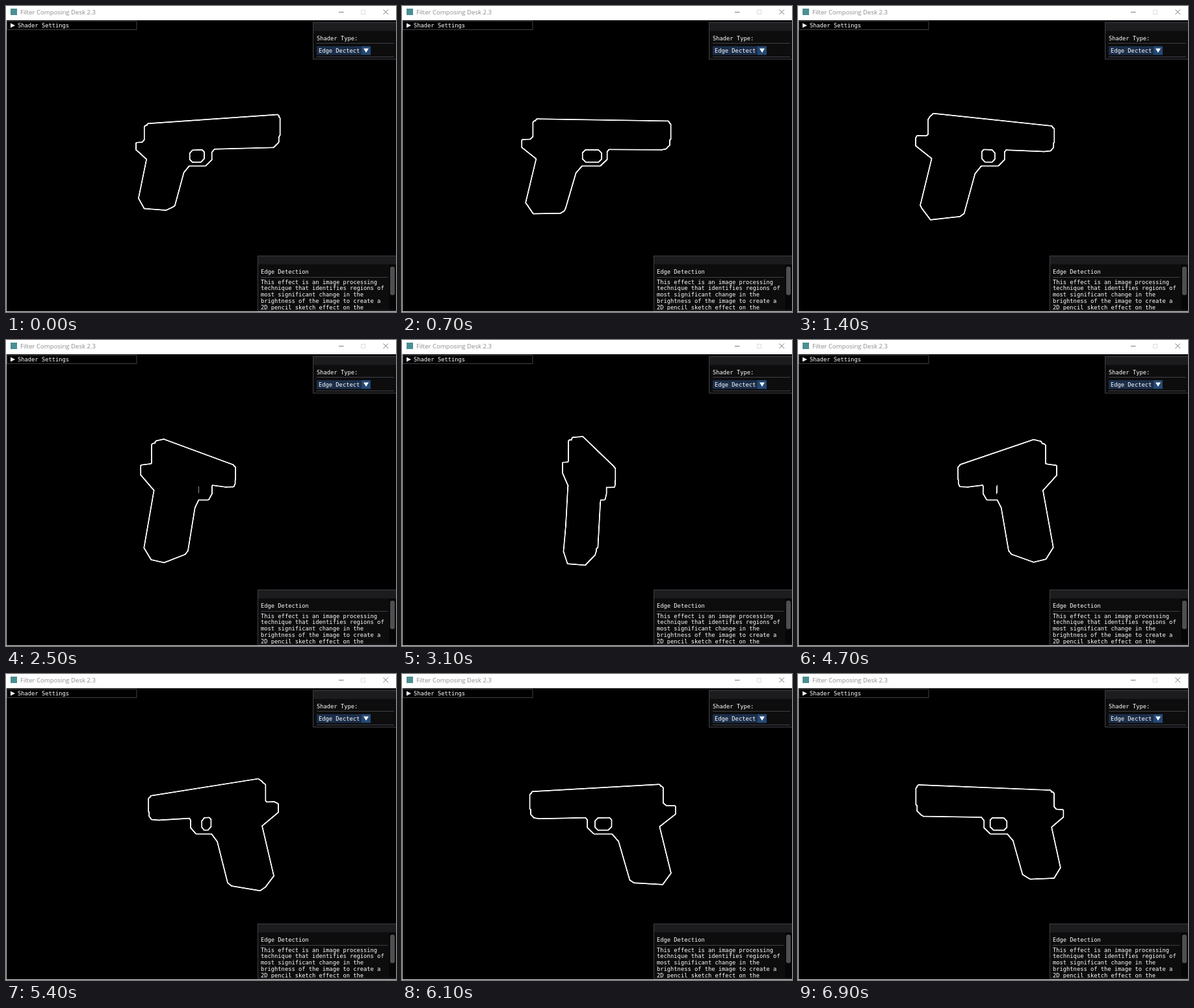
Write an HTML page with a canvas that moves like this. It is 600x472 px and loops after 7000 ms.

```html
<!DOCTYPE html>
<html lang="en">
<head>
<meta charset="utf-8">
<style>
  html, body { margin: 0; width: 100%; height: 100%; overflow: hidden; background: #000; }
  canvas, svg { position: absolute; left: 0; top: 0; }
  text { font: 8.75px "DejaVu Sans Mono", monospace; fill: #fff; white-space: pre; }
  .title { font: 9.6px "Open Sans", sans-serif; fill: #8c8c8c; }
  .panel { fill: #0d0d0e; stroke: #3f3f48; }
  .bar { fill: #1c1c1e; }
  .rule { stroke: #3f3f48; }
</style>
</head>
<body>
<canvas width="600" height="472"></canvas>
<svg width="600" height="472">
  <clipPath id="field"><rect x="478" y="62" width="66" height="14"/></clipPath>
  <clipPath id="info"><rect x="387" y="385" width="203" height="84"/></clipPath>

  <path d="M.5 22V472" stroke="#bbb"/>
  <path d="M0 471.5H600" stroke="#ddd"/>
  <rect width="600" height="22" fill="#fff"/>
  <rect x="7" y="4" width="10" height="10" fill="#4b8f92"/>
  <text class="title" x="22" y="13">Filter Composing Desk 2.3</text>
  <path d="M512 9.5h7.5M580.5 5.5l7.5 7.5m0 -7.5l-7.5 7.5" stroke="#777" fill="none"/>
  <rect x="546.5" y="6.5" width="6" height="6" fill="none" stroke="#ddd"/>

  <rect class="panel" x="1.5" y="23.5" width="199.5" height="13" style="fill: #000"/>
  <path d="M7 26.5L14 30L7 33.5Z" fill="#fff"/>
  <text x="18" y="33">Shader Settings</text>

  <rect class="panel" x="472.5" y="25.5" width="128" height="56.5"/>
  <rect class="bar" x="473" y="26" width="127" height="12.5"/>
  <text x="478" y="53">Shader Type:</text>
  <path class="rule" d="M478 57.5H597M478 78.5H597"/>
  <rect x="478" y="62" width="69" height="13.5" fill="#1b2d48"/>
  <rect x="547" y="62" width="14" height="13.5" fill="#244975"/>
  <path d="M550 65.5H558L554 72Z" fill="#fff"/>
  <text x="481" y="72" clip-path="url(#field)">Edge Dectection</text>

  <rect class="panel" x="387.5" y="385.5" width="213" height="84.5"/>
  <rect class="bar" x="388" y="386" width="212" height="12.5"/>
  <rect x="589.5" y="399" width="10" height="70" fill="#060606"/>
  <rect x="591" y="402" width="7" height="44" rx="3" fill="#4f4f4f"/>
  <path class="rule" d="M392 418.5H587"/>
  <text x="392" y="413">Edge Detection</text>
  <g id="lines" clip-path="url(#info)"></g>
</svg>
<script>
const LOOP = 7000, STEP = 100;
const CENTER_X = 301, CENTER_Y = 246, PERSPECTIVE = 0.0033;
const ctx = document.querySelector('canvas').getContext('2d');

const description = `This effect is an image processing
technique that identifies regions of
most significant change in the
brightness of the image to create a
2D pencil sketch effect on the`;
document.getElementById('lines').innerHTML = description.split('\n')
  .map((line, i) => `<text x="392" y="${428.7 + i * 9.75}">${line}</text>`).join('');

// Rectangle with cut corners.
const box = (x0, y0, x1, y1, cut) => [
  [x0 + cut, y0], [x1 - cut, y0], [x1, y0 + cut], [x1, y1 - cut],
  [x1 - cut, y1], [x0 + cut, y1], [x0, y1 - cut], [x0, y0 + cut]
];

// Side outlines (along the barrel, height), each extruded by its half thickness.
const guard = [[-32, 9], [-24, 1], [3, 1], [12, 9.5], [12, 21], [18, 28], [-32, 28]];
const tail = [[-110, 27], [-110, 36.5], [-99, 37], [-94, 42], [-60, 42], [-60, 10], [-89, 10]];
const grip = [
  [-24.5, 1], [-35, -11], [-51, -66], [-56, -69], [-94, -69],
  [-104, -54], [-89, 10], [-80, 28], [-30, 28]
];
const palm = [[-45, 15], [-62, -58], [-90, -58], [-80, 15]];
const parts = [
  { rings: [box(-94, 40, 110.5, 64, 1)], half: 8.2 },
  { rings: [box(-91, 50, 109.5, 67.5, 1)], half: 5.5 },
  { rings: [box(-90, 27, 109, 50, 5)], half: 8 },
  { rings: [guard, box(-25, 3.5, 8.5, 26.5, 6)], half: 9.8 },
  { rings: [tail], half: 8 },
  { rings: [grip], half: 9.5 },
  { rings: [palm], half: 14.5 }
];

function project([u, h], v, angle) {
  const c = Math.cos(angle), s = Math.sin(angle);
  const scale = 1 / (1 + PERSPECTIVE * (u * s + v * c));
  return [CENTER_X + (u * c - v * s) * scale, CENTER_Y - h * scale];
}

function addPolygon(path, points) {
  points.forEach(([x, y], i) => i ? path.lineTo(x, y) : path.moveTo(x, y));
  path.closePath();
}

// Both side faces plus the walls that join them.
function extrude({ rings, half }, angle) {
  const near = new Path2D(), far = new Path2D(), faces = [near, far];
  for (const ring of rings) {
    const a = ring.map(p => project(p, -half, angle));
    const b = ring.map(p => project(p, half, angle));
    addPolygon(near, a);
    addPolygon(far, b);
    a.forEach((p, i) => {
      const j = (i + 1) % a.length, wall = new Path2D();
      addPolygon(wall, [p, a[j], b[j], b[i]]);
      faces.push(wall);
    });
  }
  return faces;
}

function draw(time) {
  const seconds = Math.floor(time % LOOP / STEP) * STEP / 1000;
  const angle = (30 * seconds - 17) * Math.PI / 180;
  const faces = parts.flatMap(part => extrude(part, angle));
  ctx.fillStyle = '#000';
  ctx.fillRect(0, 0, 600, 472);
  // White strokes survive only outside the black silhouette.
  ctx.strokeStyle = '#fff';
  ctx.lineWidth = 4.6;
  for (const face of faces) ctx.stroke(face);
  ctx.strokeStyle = '#000';
  ctx.lineWidth = 1;
  for (const face of faces) {
    ctx.fill(face, 'evenodd');
    ctx.stroke(face);
  }
}

const start = performance.now();
function tick() {
  draw(performance.now() - start);
  requestAnimationFrame(tick);
}
ctx.lineJoin = 'round';
tick();
</script>
</body>
</html>
```
